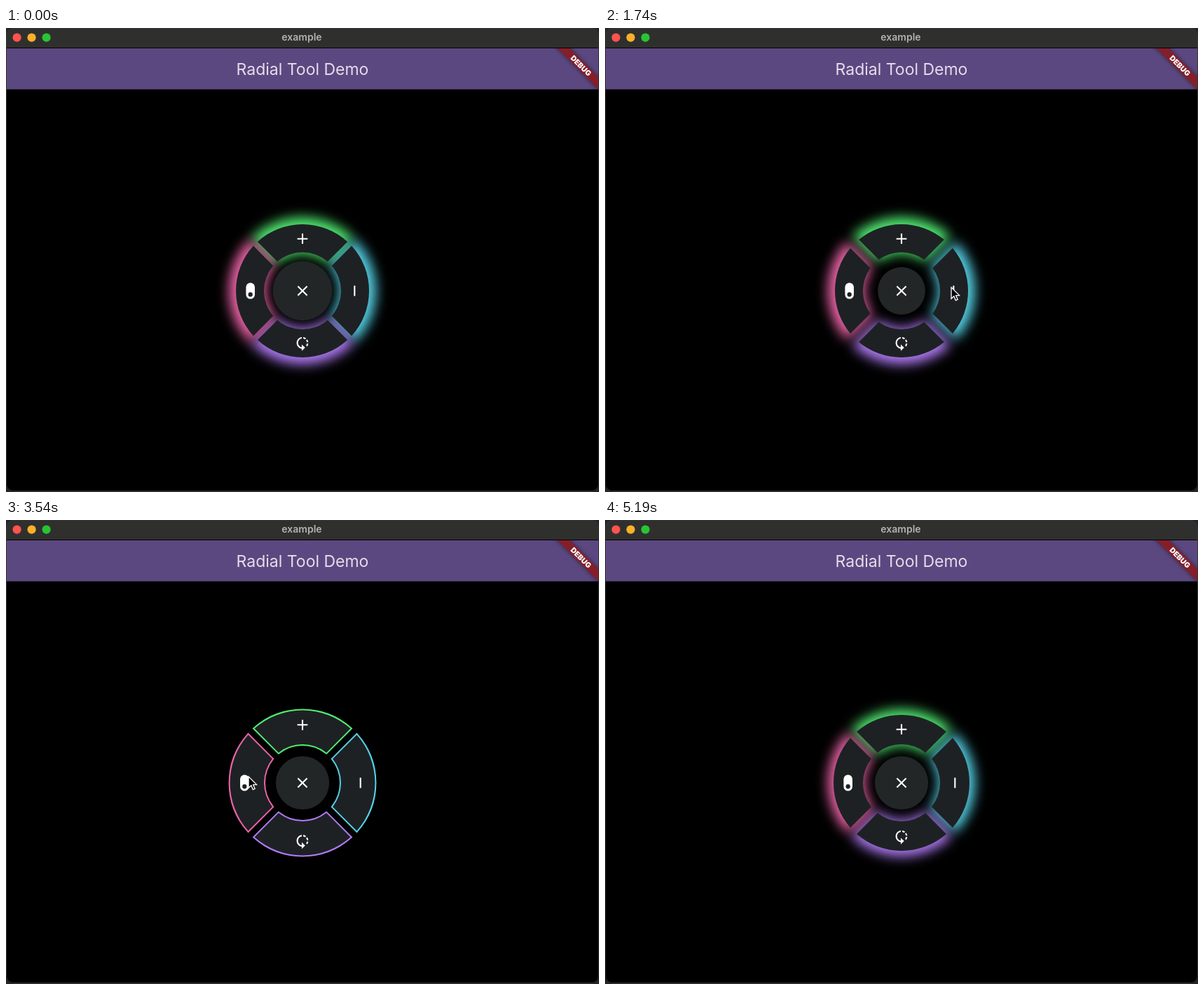
An HTML page with a canvas that plays this animation: 846x662 px, repeating every 5.22 s.

```html
<!DOCTYPE html>
<html lang="en">
<head>
<meta charset="utf-8">
<title>Radial tool</title>
<style>
  html, body { margin: 0; width: 100%; height: 100%; overflow: hidden; background: #000; }
  canvas { display: block; }
</style>
</head>
<body>
<canvas id="stage" width="846" height="662"></canvas>
<script>
const ctx = document.getElementById('stage').getContext('2d');
const LOOP = 5220, CX = 423, CY = 375, INNER = 55, GLOW_INNER = 53.5, GLOW_OUTER = 105;
// Clockwise from the top
const RING = ['#50ec72', '#55d2e6', '#b07cf6', '#ec64a8'];
const rad = deg => deg * Math.PI / 180;

const bar = new Path2D('M5 11h14v2H5z');
const plus = new Path2D('M5 11h6V5h2v6h6v2h-6v6h-2v-6H5z');
const turn = new Path2D('M7.11 8.53L5.7 7.11C4.8 8.27 4.24 9.61 4.07 11h2.02c.14-.88.49-1.72 1.02-2.47z' +
  'M6.09 13H4.07c.17 1.39.72 2.73 1.62 3.89l1.41-1.42c-.52-.75-.87-1.59-1.01-2.47z' +
  'm1.01 5.32c1.16.9 2.51 1.44 3.9 1.61V17.9c-.87-.15-1.71-.49-2.46-1.03z' +
  'M13 4.07V1L8.45 5.55 13 10V6.09c2.84.48 5 2.94 5 5.91s-2.16 5.43-5 5.91v2.02c3.95-.49 7-3.85 7-7.93s-3.05-7.44-7-7.93z');
const toggle = new Path2D('M7 6h10a6 6 0 0 1 0 12H7A6 6 0 0 1 7 6zM7 9a3 3 0 0 0 0 6a3 3 0 0 0 0-6z');
const cross = new Path2D('M19 6.41L17.59 5 12 10.59 6.41 5 5 6.41 10.59 12 5 17.59 6.41 19 12 13.41 17.59 19 19 17.59 13.41 12z');
const ICONS = [plus, bar, turn, toggle];
const arrow = new Path2D('M0 0V16.2L3.8 12.7L6.3 18.6L9.1 17.4L6.6 11.6H11.6Z');

// Time, x, y of the pointer tip
const POINTER = [
  [120, 560, 680], [560, 419, 293], [1300, 419, 293], [1620, 494, 370], [1900, 494, 370],
  [2220, 429, 439], [2500, 429, 439], [2700, 427, 441], [3100, 427, 441],
  [3400, 346, 366], [4350, 346, 366], [4800, 250, 680]
];

const smooth = p => p * p * (3 - 2 * p);

function pointerAt(t) {
  const i = POINTER.findIndex(k => k[0] > t);
  if (i < 1) return null;
  const [t0, x0, y0] = POINTER[i - 1], [t1, x1, y1] = POINTER[i];
  const p = smooth((t - t0) / (t1 - t0));
  return [x0 + (x1 - x0) * p, y0 + (y1 - y0) * p];
}

function text(str, x, y, font, color) {
  ctx.font = font + ' Inter, Roboto, sans-serif';
  ctx.textAlign = 'center';
  ctx.fillStyle = color;
  ctx.fillText(str, x, y);
}

function disc(x, y, r, color) {
  ctx.fillStyle = color;
  ctx.beginPath();
  ctx.arc(x, y, r, 0, 7);
  ctx.fill();
}

// Ring segment pointing up, with straight parallel gaps of half width h
function segment(inner, outer, h) {
  const path = new Path2D(), up = -Math.PI / 2;
  const a = rad(45) - Math.asin(h / outer), b = rad(45) - Math.asin(h / inner);
  path.arc(0, 0, outer, up - a, up + a);
  path.arc(0, 0, inner, up + b, up - b, true);
  path.closePath();
  return path;
}

function eachSegment(draw) {
  for (let i = 0; i < 4; i++) {
    ctx.save();
    ctx.rotate(i * Math.PI / 2);
    draw(i);
    ctx.restore();
  }
}

function icon(path) {
  ctx.scale(1.05, 1.05);
  ctx.translate(-12, -12);
  ctx.fillStyle = '#fff';
  ctx.fill(path, 'evenodd');
}

function drawMenu(t) {
  const spread = t < 650 ? 0 : t < 980 ? 1 : t < 1780 ? 2 : 1;
  const outlined = t >= 3480 && t < 4020;
  const outer = outlined ? 103.4 : t < 3480 ? 95 : 97;
  const h = 4.2 + 2.15 * spread;
  const spin = Math.min(1, Math.max(0, (t - 2740) / 690));

  ctx.save();
  ctx.translate(CX, CY);
  ctx.rotate(-Math.PI * (1 - Math.cos(Math.PI * spin)));

  if (!outlined) {
    const glow = segment(GLOW_INNER, GLOW_OUTER, h - 3);
    ctx.filter = 'blur(8.7px)';
    eachSegment(i => { ctx.fillStyle = RING[i]; ctx.fill(glow); });
    ctx.filter = 'none';
  }
  const face = segment(INNER, outer, h);
  eachSegment(i => {
    if (outlined) {
      // The face covers the inner half of this line
      ctx.strokeStyle = RING[i];
      ctx.lineWidth = 4;
      ctx.stroke(face);
    }
    ctx.fillStyle = '#1e2124';
    ctx.fill(face);
    ctx.translate(0, 20.7 - outer);
    icon(ICONS[i]);
  });

  disc(0, 0, 42.3 - 4.2 * spread, '#222627');
  icon(cross);
  ctx.restore();
}

function drawBanner() {
  ctx.save();
  ctx.beginPath();
  ctx.rect(1, 29, 844, 600);
  ctx.clip();
  ctx.translate(845, 29);
  ctx.rotate(Math.PI / 4);
  ctx.filter = 'blur(3px)';
  ctx.fillStyle = 'rgba(0,0,0,.5)';
  ctx.fillRect(-60, 28.8, 120, 12.4);
  ctx.filter = 'none';
  ctx.fillStyle = '#841f2a';
  ctx.fillRect(-60, 28.8, 120, 12.4);
  text('DEBUG', 0, 38.8, '900 10.5px', '#fff');
  ctx.restore();
}

function drawWindow() {
  ctx.fillStyle = '#262626';
  ctx.fillRect(0, 0, 846, 662);
  ctx.save();
  ctx.beginPath();
  ctx.roundRect(0, 0, 846, 661, 10);
  ctx.clip();
  ctx.fillStyle = '#000';
  ctx.fillRect(0, 0, 846, 662);
  ctx.fillStyle = '#2f302e';
  ctx.fillRect(0, 0, 846, 28);
  ctx.fillStyle = '#5c4880';
  ctx.fillRect(1, 29, 844, 58.5);
  ctx.restore();
  ['#ff544d', '#fdb02b', '#28c433'].forEach((c, i) => disc(15.6 + 21 * i, 13.6, 6.1, c));
  text('example', 422, 18, '600 14px', '#b3b3b1');
  text('Radial Tool Demo', 423, 67, '400 23px', '#e4ddea');
  drawBanner();
  ctx.strokeStyle = '#343434';
  ctx.lineWidth = 1;
  ctx.beginPath();
  ctx.roundRect(0.5, 0.5, 845, 660, 10);
  ctx.stroke();
}

function drawPointer(t) {
  const at = pointerAt(t);
  if (!at) return;
  ctx.save();
  ctx.translate(...at);
  ctx.fillStyle = '#000';
  ctx.fill(arrow);
  ctx.strokeStyle = '#fff';
  ctx.lineWidth = 1.3;
  ctx.stroke(arrow);
  ctx.restore();
}

const start = performance.now();
function frame() {
  const t = (performance.now() - start) % LOOP;
  drawWindow();
  drawMenu(t);
  drawPointer(t);
  requestAnimationFrame(frame);
}
frame();
</script>
</body>
</html>
```
